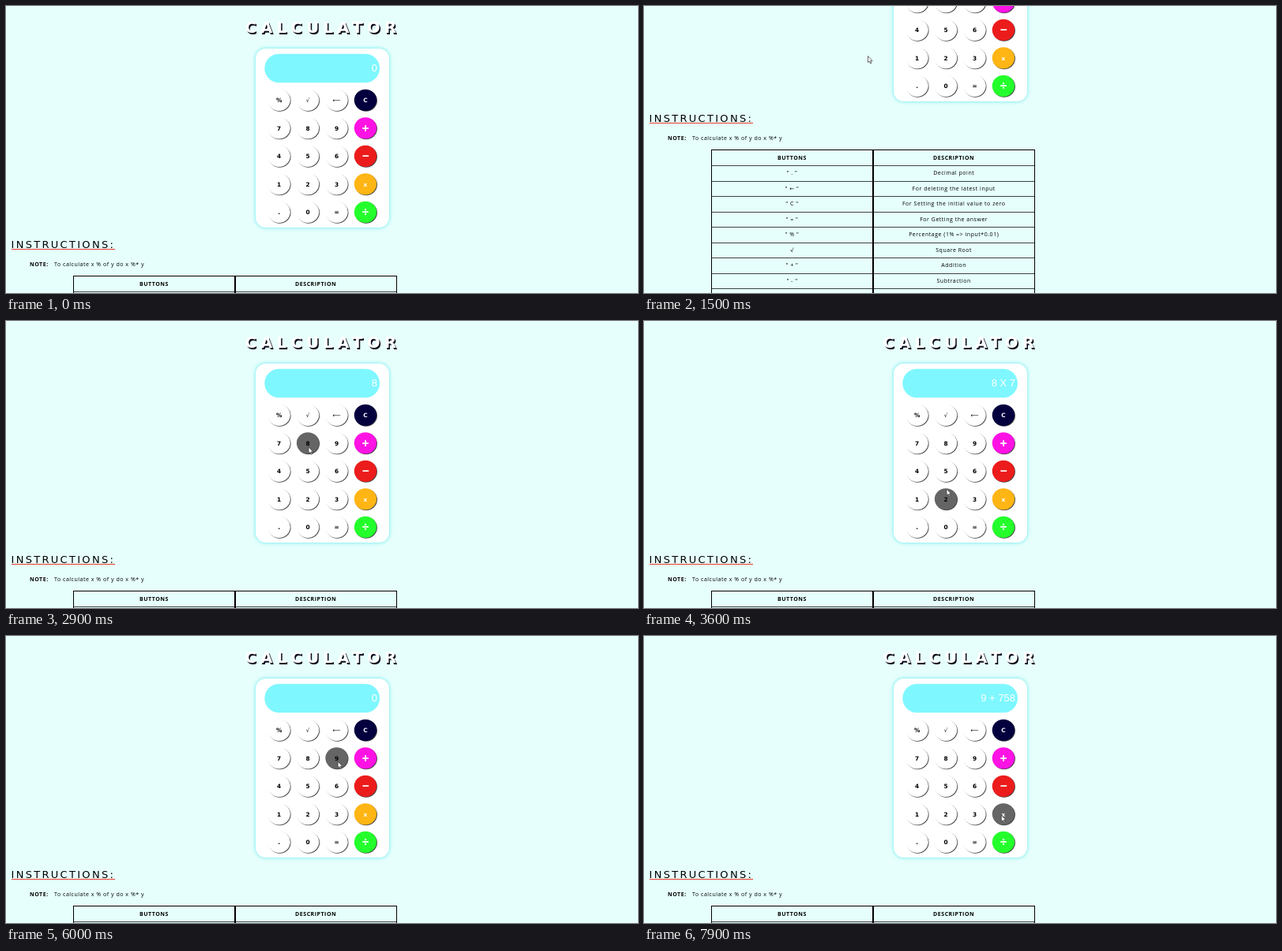
Write an HTML page that moves like this. It is 800 px wide and 364 px high and loops after 8 s.

```html
<!DOCTYPE html>
<html lang="en">
<head>
<meta charset="utf-8">
<title>Calculator</title>
<style>
  html, body { margin: 0; width: 100%; height: 100%; overflow: hidden; background: #e6fffc; }
  svg { display: block; width: 800px; height: 364px; }
  text { white-space: pre; }
  rect { shape-rendering: crispEdges; }
  rect[rx] { shape-rendering: auto; }
  .wide { font-family: "DejaVu Sans", sans-serif; }
  .body { font: 7px "Open Sans", "DejaVu Sans", sans-serif; letter-spacing: .53px; }
  .head { font-weight: 700; }
  .title { font-size: 19.5px; font-weight: 700; letter-spacing: 5.4px; fill: #fff; text-shadow: 1.5px 1.5px #080818; }
  .section { font-size: 13px; letter-spacing: 2.3px; }
  .key { font-size: 7.4px; font-weight: 700; }
  .sign { font-size: 7px; }
  .op { font: 700 16px "Open Sans", sans-serif; }
  .link { font: 500 8px Inter, sans-serif; letter-spacing: 1.2px; fill: #800060; }
  .screen { font: 13px "Liberation Sans", Arial, sans-serif; fill: #fff; }
  .card { filter: drop-shadow(0 0 2.5px #60e6ec); }
</style>
</head>
<body>
<svg viewBox="0 0 800 364"><g id="page"></g></svg>
<script>
const LOOP = 8000, STEP = 100;
const svg = document.querySelector("svg");
const page = document.getElementById("page");

function add(tag, attrs, parent = page) {
  const node = document.createElementNS("http://www.w3.org/2000/svg", tag);
  for (const name in attrs) node.setAttribute(name, attrs[name]);
  return parent.appendChild(node);
}
function write(text, x, y, cls, anchor = "start", fill = "#000") {
  const node = add("text", { x, y, class: cls, "text-anchor": anchor, fill });
  node.textContent = text;
  return node;
}
const rect = (x, y, width, height, fill, extra = {}) =>
  add("rect", { x, y, width, height, fill, ...extra });

// Calculator
write("CALCULATOR", 302.5, 34, "wide title");
rect(316, 54, 169, 227, "#fff", { rx: 13, class: "card" });
rect(327.3, 60.7, 145.7, 36.6, "#7ff7ff", { rx: 18.3 });
const screen = write("0", 470, 83, "screen", "end");

const RX = 14.2, RY = 13.6;
const opColors = ["#04003e", "#ff12e4", "#ec1c1c", "#ffb514", "#24ff2c"];
const keys = {};
["%√⟵C", "789+", "456−", "123x", ".0=÷"].forEach((row, r) => {
  [...row].forEach((label, c) => {
    const cx = 345.6 + c * 36.45, cy = 119.3 + r * 35.5;
    const isOp = c === 3;
    const fill = isOp ? opColors[r] : "#fff";
    add("ellipse", { cx: cx + .8, cy: cy + .8, rx: RX, ry: RY, fill: "#444" });
    const face = add("ellipse", { cx, cy, rx: RX, ry: RY, fill });
    const big = "+−÷".includes(label);
    const cls = big ? "op" : "√⟵".includes(label) ? "wide sign" : "wide key";
    write(label, cx, cy + (big ? 5.7 : 2.8), cls, "middle", isOp ? "#fff" : "#000");
    keys[label] = { face, cx, cy, fill };
  });
});

// Instructions
write("INSTRUCTIONS:", 6.5, 307, "wide section");
rect(7, 308, 131, 1, "#ee3a30");
write("NOTE:", 30, 330, "body head");
write("To calculate x % of y do x %* y", 61, 330, "body");

const rows = [
  ["BUTTONS", "DESCRIPTION"],
  ['" . "', "Decimal point"],
  ['" ← "', "For deleting the latest input"],
  ['" C "', "For Setting the initial value to zero"],
  ['" = "', "For Getting the answer"],
  ['" % "', "Percentage (1% => input*0.01)"],
  ["√", "Square Root"],
  ['" + "', "Addition"],
  ['" - "', "Subtraction"],
  ['" X "', "Multiplication"],
  ['" ÷ "', "Division"]
];
const TOP = 342.5, PITCH = 19.5;
rows.forEach(([button, description], i) => {
  const y = TOP + i * PITCH, cls = i ? "body" : "body head";
  if (i) rect(85, y, 409, 1, "#3c4444");
  write(button, 187.5, y + 12.3, cls, "middle");
  write(description, 392.2, y + 12.3, cls, "middle");
});
rect(85.5, TOP, 409, PITCH * rows.length, "none", { stroke: "#000" });
rect(289, TOP, 2, PITCH * rows.length, "#000");

// Footer
rect(156, 571, 488, 1, "#bfd9d7");
["Repzun", "Joblanex"].forEach((name, i) => {
  const x = 337 + i * 70;
  rect(x, 580, 10, 10, "#000");
  write(name, x + 13.7, 590.5, "link");
});

const cursor = add("path", {
  d: "M0 0V8.2L1.9 6.5 3.2 9.5 4.4 9 3.1 6.1H5.6Z",
  fill: "#fff", stroke: "#333", "stroke-width": .7
}, svg);

function ease(k) {
  k = Math.min(1, Math.max(0, k));
  return k * k * (3 - 2 * k);
}

// Two bursts of key presses, each at a steady pace
const burst = (labels, start, gap) =>
  [...labels].map((label, i) => ({ label, time: start + i * gap }));
const presses = [...burst("8x7=+9=C", 2900, 280), ...burst("9+758x", 6100, 370)];

const SHOWN = 300, RETURN = 2500;
const rest = { x: 283.5, y: 63.5, time: RETURN };
const stops = [rest, ...presses.map(({ label, time }) =>
  ({ x: keys[label].cx + 1, y: keys[label].cy + 5, time }))];

function cursorAt(t) {
  const last = stops.findLastIndex(stop => stop.time <= t);
  const a = stops[Math.max(last, 0)], b = stops[last + 1] ?? a;
  const k = ease((t - a.time) / (b.time - a.time || 1));
  return { x: a.x + (b.x - a.x) * k, y: a.y + (b.y - a.y) * k };
}

// Wheel notches of 80px down to the page end, then straight back to the top
function scrollAt(t) {
  if (t >= RETURN) return 0;
  let sum = 0;
  for (let notch = 0; notch < 4; notch++) sum += 80 * ease((t - 700 - notch * 400) / 200);
  return Math.min(246, sum);
}

function press(value, label) {
  if (label === "C") return "0";
  if (label === "=") {
    const [a, op, b] = value.split(" ");
    return String(op === "X" ? a * b : +a + +b);
  }
  if ("+x".includes(label)) return `${value} ${label.toUpperCase()} `;
  return value === "0" ? label : value + label;
}
const screenAt = t => presses
  .filter(({ time }) => time <= t)
  .reduce((value, { label }) => press(value, label), "0");

function draw(now) {
  const t = Math.floor(now % LOOP / STEP) * STEP;
  const scroll = scrollAt(t), { x, y } = cursorAt(t);
  page.setAttribute("transform", `translate(0 ${-scroll})`);
  cursor.setAttribute("transform", `translate(${x} ${y})`);
  cursor.setAttribute("opacity", t >= SHOWN ? 1 : 0);
  for (const { face, cx, cy, fill } of Object.values(keys)) {
    const over = Math.hypot((x - cx) / RX, (y + scroll - cy) / RY) < 1;
    face.setAttribute("fill", over ? "#656565" : fill);
  }
  screen.textContent = screenAt(t);
}

const start = performance.now();
function tick() {
  draw(performance.now() - start);
  requestAnimationFrame(tick);
}
tick();
</script>
</body>
</html>
```
